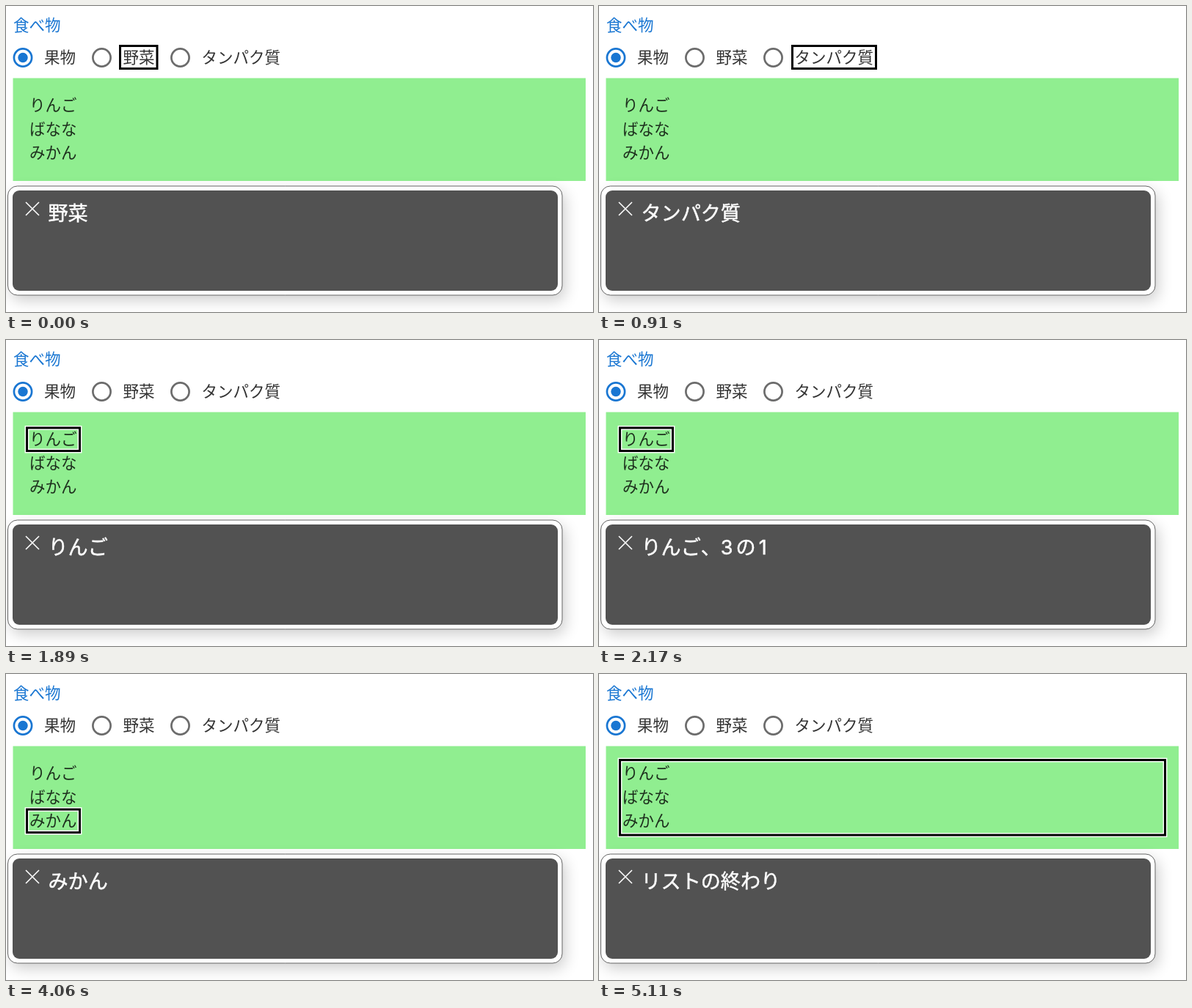
Animation, 800 px wide and 418 px high, one loop 5180 ms. Source, as an HTML page with a canvas:

```html
<!DOCTYPE html>
<html lang="ja">
<head>
<meta charset="utf-8">
<title>食べ物</title>
<style>
  html, body { margin: 0; width: 100%; height: 100%; overflow: hidden; background: #fff; }
  canvas { display: block; width: 800px; height: 418px; }
</style>
</head>
<body>
<canvas id="stage" lang="ja"></canvas>
<script>
const W = 800, H = 418, LOOP = 5180;
const JP = '"Noto Sans CJK JP", "Noto Sans CJK", sans-serif';
const BLUE = '#1976d2', INK = 'rgba(0,0,0,.8)';

const canvas = document.getElementById('stage');
const ctx = canvas.getContext('2d');
const dpr = window.devicePixelRatio || 1;
canvas.width = W * dpr;
canvas.height = H * dpr;

// Outer edges of the reading cursor: x, y, width, height
const focus = {
  veg: [154, 53, 53.5, 34],
  protein: [262, 53, 117, 34],
  list: [27, 116, 746, 105.5],
  apple: [27, 118.5, 75, 34.5],
  banana: [27, 151, 75, 34.5],
  orange: [27, 183.5, 75, 34.5]
};

// start time, cursor, spoken caption
const steps = [
  [0, 'veg', '野菜'],
  [770, 'protein', 'タンパク質'],
  [1120, 'list', 'リスト3項目'],
  [1890, 'apple', 'りんご'],
  [2170, 'apple', 'りんご、3の1'],
  [2800, 'banana', 'ばなな'],
  [3080, 'banana', 'ばなな、3の2'],
  [3990, 'orange', 'みかん'],
  [4270, 'orange', 'みかん、3の3'],
  [4970, 'list', 'リストの終わり']
];

function label(str, x, y, color = INK) {
  ctx.font = `300 21.5px ${JP}`;
  ctx.fillStyle = color;
  ctx.fillText(str, x, y);
}

function circle(x, y, r) {
  ctx.beginPath();
  ctx.arc(x, y, r, 0, Math.PI * 2);
}

function radio(x, on) {
  ctx.strokeStyle = on ? BLUE : '#6c6c6c';
  ctx.lineWidth = 2.7;
  circle(x, 70.5, 12.1);
  ctx.stroke();
  if (!on) return;
  ctx.fillStyle = BLUE;
  circle(x, 70.5, 6.7);
  ctx.fill();
}

function roundBox(x, y, w, h, r) {
  ctx.beginPath();
  ctx.roundRect(x, y, w, h, r);
}

function page() {
  ctx.fillStyle = '#fff';
  ctx.fillRect(0, 0, W, H);
  label('食べ物', 10, 33.8, BLUE);
  radio(23, true);
  label('果物', 52, 77.7);
  radio(130.5);
  label('野菜', 159.5, 77.7);
  radio(237.5);
  label('タンパク質', 266.5, 77.7);
  ctx.fillStyle = '#90ee90';
  ctx.fillRect(9.5, 98.5, 780.5, 140.5);
  ['りんご', 'ばなな', 'みかん'].forEach((s, i) => label(s, 32, 143.2 + i * 32.5));
}

function cursor([x, y, w, h]) {
  for (const [color, width] of [['#fff', 5.8], ['#000', 3]]) {
    ctx.strokeStyle = color;
    ctx.lineWidth = width;
    ctx.strokeRect(x + 1.5, y + 1.5, w - 3, h - 3);
  }
}

function panel() {
  ctx.save();
  ctx.shadowColor = 'rgba(0,0,0,.2)';
  ctx.shadowBlur = 20 * dpr;
  ctx.shadowOffsetX = 4 * dpr;
  ctx.shadowOffsetY = 7 * dpr;
  ctx.fillStyle = '#fff';
  roundBox(2.5, 246, 755.5, 149, 13);
  ctx.fill();
  ctx.restore();
  ctx.strokeStyle = '#666';
  ctx.lineWidth = 1;
  ctx.stroke();
  ctx.fillStyle = '#525252';
  roundBox(9, 252, 743, 137, 9);
  ctx.fill();
  ctx.strokeStyle = '#fff';
  ctx.lineWidth = 1.6;
  ctx.beginPath();
  ctx.moveTo(27, 268);
  ctx.lineTo(45, 286);
  ctx.moveTo(45, 268);
  ctx.lineTo(27, 286);
  ctx.stroke();
}

// Digits get a small gap next to kana or kanji, but not after a comma
function caption(str) {
  let x = 57.5, prev = '';
  ctx.fillStyle = ctx.strokeStyle = '#fff';
  ctx.lineWidth = 0.5;
  ctx.lineJoin = 'round';
  for (const run of str.split(/(\d)/).filter(Boolean)) {
    ctx.font = `400 27.1px ${/\d/.test(run) ? 'Inter, sans-serif' : JP}`;
    if (prev && !prev.endsWith('、')) x += 4;
    ctx.fillText(run, x, 293);
    ctx.strokeText(run, x, 293);
    x += ctx.measureText(run).width;
    prev = run;
  }
}

function draw(now) {
  const t = now % LOOP;
  const [, target, text] = steps.findLast(s => s[0] <= t);
  ctx.setTransform(dpr, 0, 0, dpr, 0, 0);
  ctx.lineJoin = 'miter';
  page();
  cursor(focus[target]);
  panel();
  caption(text);
}

const start = performance.now();
function tick() {
  draw(performance.now() - start);
  requestAnimationFrame(tick);
}
tick();
</script>
</body>
</html>
```
